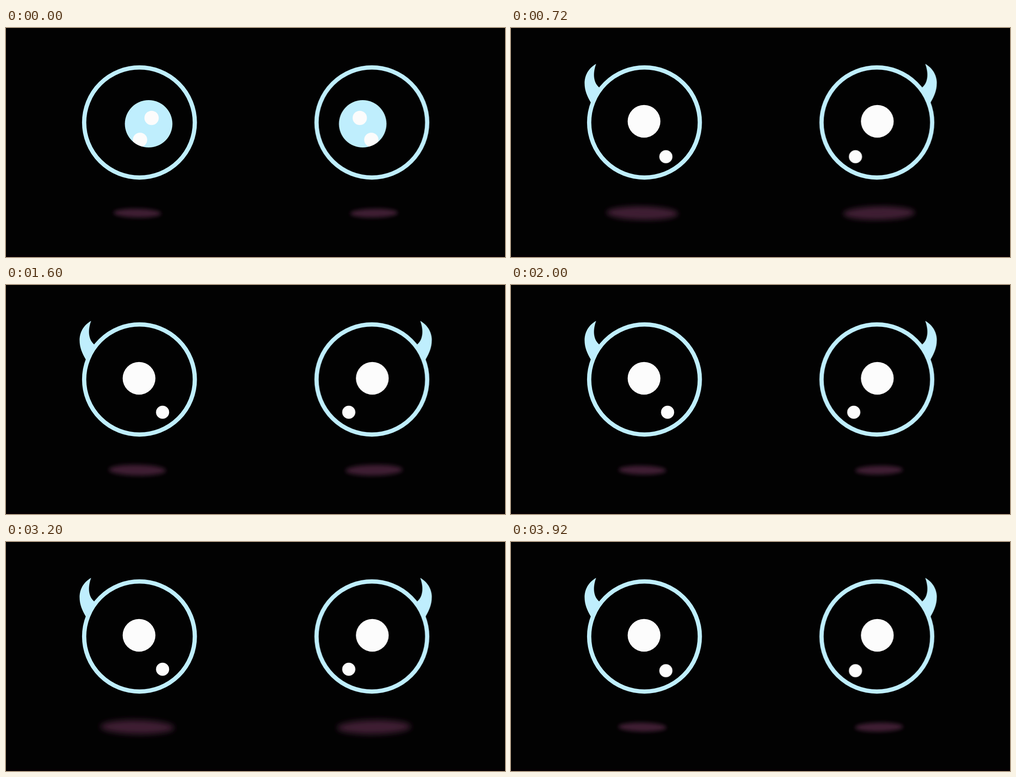
Recreate the animation shown at these times as an HTML page. Size 1102 by 508 pixels, loop 4 s.

```html
<!DOCTYPE html>
<html lang="en">
<head>
<meta charset="utf-8">
<title>Blinking eyes</title>
<style>
  html, body { margin: 0; width: 100%; height: 100%; overflow: hidden; background: #020202; }
  svg { display: block; width: 100%; height: 100%; }

  .lid { animation: lid 4s step-end infinite; }
  .ring { fill: none; stroke: #bfeefd; stroke-width: 9.4; }
  .inside { fill: #020202; }
  .blue { fill: #bfeefd; }
  .white { fill: #fcfcfc; }
  .before { animation: before 4s step-end infinite; }
  .after { animation: after 4s step-end infinite; }
  .closed { animation: closed 4s step-end infinite; }
  .horn { animation: horn 4s step-end infinite; }
  .glint { animation: shake .2s step-end infinite; }
  .blush { fill: #3c1e30; animation: pulse 2s ease-in-out infinite; }

  @keyframes lid {
    0% { ry: 122.1px; }
    1% { ry: 92px; }
    2% { ry: 61px; }
    3% { ry: 30px; }
    4% { ry: 0px; }
    8% { ry: 47px; }
    9% { ry: 94.8px; }
    10%, 100% { ry: 122.1px; }
  }
  @keyframes horn {
    0% { transform: translateY(45px); }
    9% { transform: translateY(16px); }
    10%, 100% { transform: translateY(0); }
  }
  @keyframes before {
    0% { opacity: 1; }
    4%, 100% { opacity: 0; }
  }
  @keyframes after {
    0% { opacity: 0; }
    8%, 100% { opacity: 1; }
  }
  @keyframes closed {
    0% { opacity: 0; }
    4% { opacity: 1; }
    8%, 100% { opacity: 0; }
  }
  @keyframes shake {
    0%, 40%, 100% { transform: translate(0, 0); }
    20% { transform: translate(3.8px, -3.3px); }
    60%, 80% { transform: translate(-3.8px, 3.2px); }
  }
  @keyframes pulse {
    0%, 100% { transform: scale(1); }
    50% { transform: scale(1.6); }
  }
</style>
</head>
<body>
<svg viewBox="0 0 1102 508" preserveAspectRatio="none">
  <defs>
    <clipPath id="opening"><ellipse class="lid" cx="294.8" cy="209.6" rx="122.2" ry="122.1"/></clipPath>
    <clipPath id="iris"><circle cx="315" cy="212.6" r="52.5"/></clipPath>
    <filter id="soft" x="-40%" y="-150%" width="180%" height="400%"><feGaussianBlur stdDeviation="4"/></filter>
  </defs>
  <rect width="1102" height="508" fill="#020202"/>
  <rect y="504" width="1102" height="4" fill="#060003"/>

  <g id="left">
    <g class="after">
      <path class="horn blue" d="M188 79.5C170 90 162.5 106 162.5 123C162.5 138 168 151 176 165L181 173L202 150L195 132C183 122 179.5 103 188 79.5Z"/>
    </g>
    <ellipse class="lid inside" cx="294.8" cy="209.6" rx="122.2" ry="122.1"/>
    <g clip-path="url(#opening)">
      <g class="before">
        <circle class="blue" cx="315" cy="212.6" r="52.5"/>
        <g class="white" clip-path="url(#iris)">
          <circle cx="321.5" cy="199.5" r="15.8"/>
          <circle cx="296" cy="248" r="15.8"/>
        </g>
      </g>
      <g class="after">
        <circle class="white" cx="293.8" cy="207" r="36.2"/>
        <circle class="white glint" cx="345.8" cy="282.2" r="14.5"/>
      </g>
    </g>
    <ellipse class="lid ring" cx="294.8" cy="209.6" rx="122.2" ry="122.1"/>
    <rect class="closed blue" x="134" y="204.9" width="321" height="9.4" rx="4.7"/>
    <g transform="translate(290 410.7) rotate(1)">
      <ellipse class="blush" rx="52.5" ry="10" filter="url(#soft)"/>
    </g>
  </g>
</svg>
<script>
  // The right eye is a mirrored copy of the left one.
  const left = document.getElementById('left');
  const right = left.cloneNode(true);
  right.id = 'right';
  right.setAttribute('transform', 'translate(1102.8 0) scale(-1 1)');
  left.after(right);
</script>
</body>
</html>
```
